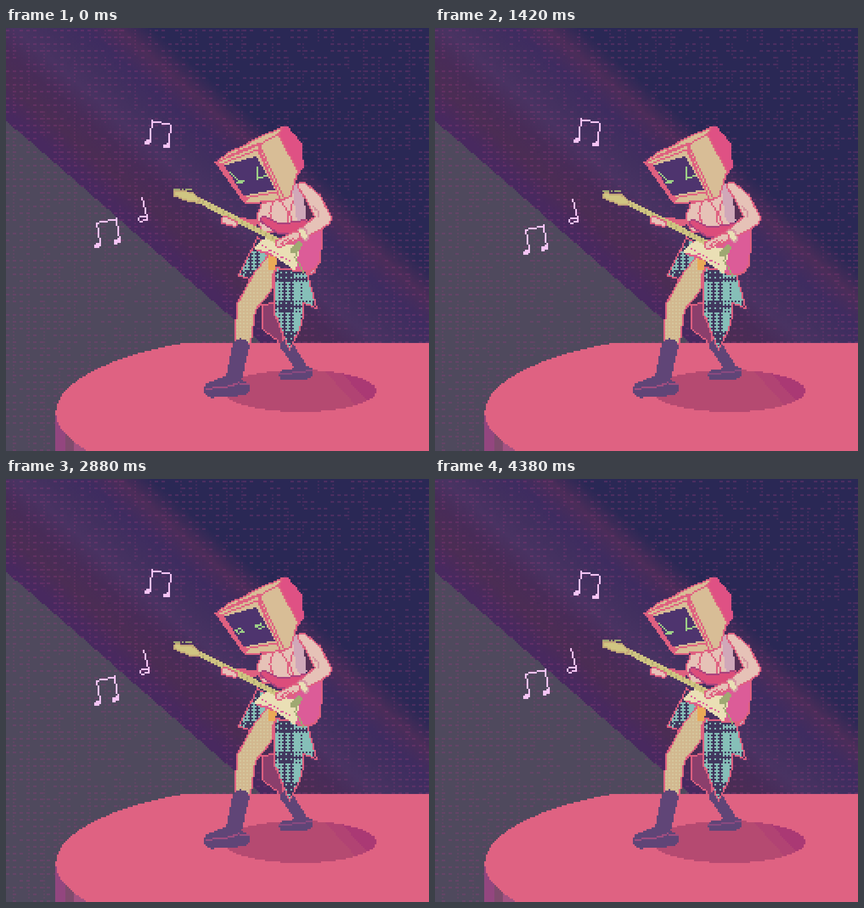
These frames come from a looping animation (748x748 px, 4540 ms). An HTML page with a canvas:

```html
<!DOCTYPE html>
<html lang="en">
<head>
<meta charset="utf-8">
<title>Guitar stage</title>
<style>
html, body { margin: 0; width: 100%; height: 100%; overflow: hidden; background: #2b2955; }
canvas { display: block; width: 100vw; height: 100vh; image-rendering: pixelated; }
</style>
</head>
<body>
<canvas id="stage" width="250" height="250"></canvas>
<script>
const CELLS = 250, UNIT = 748 / CELLS, LOOP = 4540, STEP = 1000 / 24;
const stage = document.getElementById('stage').getContext('2d');
const backdrop = document.createElement('canvas');
backdrop.width = backdrop.height = CELLS;

const PINK = '#df6080', SKIN = '#e6c2b7', TAN = '#d8bd96', TEAL = '#86bfb8', BOOT = '#604577',
  CREAM = '#eadfb5', GUITAR = '#dc5c98', NECK = '#d0c582', OLIVE = '#9fa872', MAUVE = '#d0a8b9',
  NOTE = '#f6c5f5', GREEN = '#9fd287';

let ctx = backdrop.getContext('2d');
const still = (x, y) => [x, y];
const shift = (dx, dy) => (x, y) => [x + dx, y + dy];
let pose = still;

const toCell = (x, y) => pose(x, y).map(v => v / UNIT);
const points = text => text.split(' ').map(pair => toCell(...pair.split(',').map(Number)));

function dot(x, y, paint) {
  ctx.fillStyle = typeof paint === 'function' ? paint(x, y) : paint;
  ctx.fillRect(x, y, 1, 1);
}

// Hard-edged polygon on the coarse grid; paint is a colour or (x, y) => colour.
function fill(text, paint) {
  const p = points(text), ys = p.map(q => q[1]);
  for (let y = Math.floor(Math.min(...ys)); y <= Math.max(...ys); y++) {
    const hits = [], mid = y + 0.5;
    p.forEach(([x1, y1], i) => {
      const [x2, y2] = p[(i + 1) % p.length];
      if ((y1 <= mid) !== (y2 <= mid)) hits.push(x1 + (mid - y1) / (y2 - y1) * (x2 - x1));
    });
    hits.sort((a, b) => a - b);
    for (let i = 0; i + 1 < hits.length; i += 2)
      for (let x = Math.round(hits[i]); x < Math.round(hits[i + 1]); x++) dot(x, y, paint);
  }
}

function line(text, color) {
  const p = points(text);
  for (let i = 1; i < p.length; i++) {
    const [x1, y1] = p[i - 1], dx = p[i][0] - x1, dy = p[i][1] - y1;
    const n = Math.ceil(Math.max(Math.abs(dx), Math.abs(dy))) || 1;
    for (let k = 0; k <= n; k++) dot(Math.floor(x1 + dx * k / n), Math.floor(y1 + dy * k / n), color);
  }
}

function shape(text, paint, edge = PINK) {
  fill(text, paint);
  line(text + ' ' + text.split(' ')[0], edge);
}

// Rounded limb through joints [x, y, radius], tapered between them.
function limb(paint, edge, ...joints) {
  const j = joints.map(([x, y, r]) => [...toCell(x, y), r / UNIT]);
  const span = axis => [Math.min(...j.map(q => q[axis] - q[2])), Math.max(...j.map(q => q[axis] + q[2]))].map(Math.floor);
  const [left, right] = span(0), [top, bottom] = span(1);
  const depth = (x, y) => Math.max(...j.slice(1).map(([x2, y2, r2], i) => {
    const [x1, y1, r1] = j[i], dx = x2 - x1, dy = y2 - y1;
    const t = Math.min(1, Math.max(0, ((x - x1) * dx + (y - y1) * dy) / (dx * dx + dy * dy)));
    return r1 + (r2 - r1) * t - Math.hypot(x - x1 - dx * t, y - y1 - dy * t);
  }));
  for (let y = top; y <= bottom; y++) for (let x = left; x <= right; x++) {
    const d = depth(x + 0.5, y + 0.5), color = d < 1 ? edge : paint;
    if (d > 0 && color) dot(x, y, color);
  }
}

function ellipse(cx, cy, rx, ry, paint, top = 0) {
  for (let y = top; y < CELLS; y++) {
    const k = ((y + 0.5) * UNIT - cy) / ry;
    if (Math.abs(k) >= 1) continue;
    const half = rx * Math.sqrt(1 - k * k);
    for (let x = Math.round((cx - half) / UNIT); x < Math.min(CELLS, Math.round((cx + half) / UNIT)); x++) dot(x, y, paint);
  }
}

const noise = (x, y) => {
  const s = Math.sin(x * 12.9898 + y * 78.233) * 43758.5453;
  return s - Math.floor(s);
};

const plaid = (x, y) => {
  const across = (x + 19) % 20 < 9, down = (y + 1) % 18 < 7;
  const dark = across && down ? x % 3 || y % 3
    : across ? x % 4 === 0 || (x % 2 && y % 2)
    : down ? y % 4 === 0 || (x % 2 && y % 2)
    : x % 20 === 14 && y % 2;
  return dark ? '#41375e' : TEAL;
};

const stocking = (x, y) => x % 2 || y % 2 ? '#d2b88f' : '#d5c69c';
const shade = x => x < 206 ? '#b54a71' : x < 210 ? '#b1437 '.trim() + '3' : '#ad3d74';

function drawLights() {
  const slope = 0.87, first = -225, gap = 53;
  const colors = ['#2a2855', '#4b2d59', '#3e2c60', '#42305f', '#493362', '#482c58', '#4b2d54', '#48295f'];
  const at = u => [-slope, 1].map(n => n * u / (1 + slope * slope) / UNIT);
  const light = ctx.createLinearGradient(...at(first), ...at(first + gap * (colors.length - 1)));
  colors.forEach((color, i) => light.addColorStop(i / (colors.length - 1), color));
  ctx.fillStyle = light;
  ctx.fillRect(0, 0, CELLS, CELLS);
  fill('0,164 748,815 0,815', '#4f495d');

  for (let y = 0; y < CELLS; y++) for (let x = 0; x < CELLS; x++) {
    const weave = y % 4 === 1 && x % 4 < 2 && noise(x >> 2, y) < 0.7;
    const thread = x % 9 === 4 && y % 2 && noise(x, y >> 3) < 0.5;
    if (weave || thread) dot(x, y, `rgba(150,60,125,${weave ? 0.32 : 0.22})`);
  }
}

function drawPlatform() {
  const stripes = ['#93467f', '#7f4b6d', '#a35382', '#a35382'];
  stripes.forEach((color, i) => {
    const x = 88 + i * 15.5;
    fill(`${x},680 ${x + 15.5},680 ${x + 15.5},749 ${x},749`, color);
  });
  ellipse(578, 680, 490, 146, '#df6282', 186);
  ellipse(520, 642, 135, 37, (x, y) => {
    const streak = x - 0.9 * y;
    return streak < 6 || streak > 28 ? '#b54a71' : streak < 15 ? '#b14373' : '#aa3974';
  });
}

function drawLegs() {
  shape('454,490 476,484 485,512 490,562 454,532', '#8b3f6c');
  limb(BOOT, BOOT, [496, 562, 11], [520, 598, 10]);
  limb(BOOT, BOOT, [492, 614, 9], [532, 610, 11]);
  line('484,613 510,610 540,606', '#8a4a80');
  limb(stocking, PINK, [460, 418, 16], [450, 455, 22], [425, 492, 18], [419, 548, 16]);
  fill('462,400 480,404 476,427 464,428', '#eaa957');
  limb(BOOT, BOOT, [415, 564, 15], [404, 615, 14]);
  limb(BOOT, BOOT, [364, 640, 14], [392, 634, 19], [418, 637, 13]);
  line('354,638 390,635 412,628 430,631', '#a04d80');
}

function drawClothes() {
  shape('445,370 463,386 463,404 430,443 411,438 429,403', plaid);
  shape('476,424 531,431 549,495 526,486 523,522 501,570 473,500', plaid);
  limb(MAUVE, PINK, [541, 405, 7], [540, 429, 7]);
}

function drawTorso() {
  shape('451,312 516,290 531,332 526,358 456,362 442,340', SKIN);
  limb(MAUVE, MAUVE, [514, 284, 8], [523, 335, 10]);
  for (const x of [472, 507]) line(`${x},308 ${x - 6},328 ${x},346`, PINK);
  line('486,308 496,320 500,346', PINK);
}

function drawGuitar(low) {
  limb(PINK, PINK, [400, 342, 6], [442, 343, 6]);
  pose = shift(0, low ? 6 : 0);
  limb(GUITAR, PINK, [447, 390, 6], [500, 395, 18]);
  limb(GUITAR, PINK, [538, 358, 22], [528, 402, 30]);
  limb('#dc4d7b', '#a8427d', [456, 339, 7], [484, 356, 10], [526, 350, 11]);
  fill('438,390 459,370 519,388 512,430 464,396', CREAM);
  for (let i = 0; i < 8; i++) line(`${452 + i * 7},${384 + i * 4} ${453 + i * 7},${384 + i * 4}`, GUITAR);
  limb(OLIVE, OLIVE, [518, 383, 6], [509, 393, 6]);
  line('516,385 511,405 526,432', OLIVE);
  pose = shift(0, low ? 4 : 0);
  limb(NECK, NECK, [338, 303, 5], [480, 376, 5]);
  limb(NECK, '#c4a878', [301, 293, 6], [326, 299, 10], [338, 304, 6]);
  for (let i = 0; i < 12; i++) line(`${350 + i * 11},${308 + i * 5.6} ${350 + i * 11},${311 + i * 5.6}`, '#b5ad73');
  for (let i = 0; i < 5; i++) line(`${298 + i * 7},285 ${300 + i * 7},285`, OLIVE);
  pose = still;
  limb(SKIN, PINK, [387, 340, 8], [404, 346, 6]);
}

function drawArm(low) {
  fill('526,296 546,337 532,345', '#553054');
  limb(SKIN, PINK, [524, 280, 9], [545, 304, 14], [562, 337, 15], [522, 365, 10]);
  line('544,316 551,325 552,334', '#d596a0');
  pose = shift(0, low ? 3 : 0);
  limb(CREAM, '#d696a3', [523, 361, 9], [529, 369, 7]);
  limb(SKIN, PINK, [512, 367, 9], [483, 381, 8]);
  for (const x of [499, 508]) line(`${x},373 ${x - 14},382`, PINK);
  pose = still;
}

function drawHead(low, blink) {
  const turn = 0.035;
  pose = low ? (x, y) => [x + 1 - turn * (y - 260), y + 3 + turn * (x - 450)] : still;
  fill('476,182 490,172 498,174 523,205 526,246 515,262', '#df5184');
  shape('371,239 393,221 489,174 482,189 446,209', TAN);
  shape('446,209 480,188 516,252 503,298 484,306', TAN);
  shape('371,239 445,208 485,304 424,311', TAN);
  fill('371,239 386,239 427,303 424,311', PINK);
  line('386,239 445,216 480,290 421,301', PINK);
  line('393,226 447,205 491,300', PINK);
  fill('386,243 442,227 476,286 420,297', '#4e346e');
  if (blink) for (const [x, y] of [[413, 269], [448, 261]])
    line(`${x - 7},${y - 2} ${x + 1},${y - 4} ${x + 7},${y + 1} ${x - 2},${y + 4} ${x - 7},${y - 2}`, GREEN);
  else {
    line('396,256 411,270 419,272 408,274', GREEN);
    line('445,248 443,267 449,264 458,263', GREEN);
  }
  pose = still;
}

function beamedNotes(x, y, width, rise, lean, height) {
  line(`${x},${y} ${x + width},${y + rise}`, NOTE);
  for (const [stemX, stemY] of [[x, y], [x + width, y + rise]]) {
    const footX = stemX + lean, footY = stemY + height;
    line(`${stemX},${stemY} ${footX},${footY}`, NOTE);
    limb(NOTE, NOTE, [footX - 8, footY + 2, 4], [footX - 2, footY, 4]);
  }
}

function drawNotes(moved) {
  const lift = moved ? 1 : 0;
  beamedNotes(258, 164 - 3 * lift, 33, 7, -2, 37);
  beamedNotes(160, 345 + 12 * lift, 35 - 3 * lift, -7, 7, 38);
  pose = shift(3 * lift, 3 * lift);
  line('241,300 250,335', NOTE);
  limb(null, NOTE, [239, 338, 5], [246, 337, 5]);
  pose = still;
}

// Each burst of strumming alternates between two poses every four ticks.
const BURSTS = [[3, 7], [16, 52], [58, 62], [69, 89]];
const strums = tick => BURSTS.some(([from, to]) => tick >= from && tick < to && (tick - from) % 8 < 4);
const nods = tick => tick >= 2 && tick < 97 && (Math.min(tick, 91) - 2) % 30 >= 15;
const blinks = tick => tick < 99 && tick % 33 >= 3 && tick % 33 < 7;

function drawScene(tick) {
  ctx.drawImage(backdrop, 0, 0);
  const strum = strums(tick);
  drawTorso();
  drawGuitar(strum);
  drawArm(strum);
  drawHead(nods(tick), blinks(tick));
  drawNotes(tick % 5 === 4);
}

drawLights();
drawPlatform();
drawLegs();
drawClothes();
ctx = stage;

let shown = -1;
function play() {
  const time = Math.floor(performance.now() % LOOP / 10) * 10;
  const tick = Math.min(108, Math.floor((time + 4.9) / STEP));
  if (tick !== shown) drawScene(shown = tick);
  requestAnimationFrame(play);
}
play();
</script>
</body>
</html>
```
